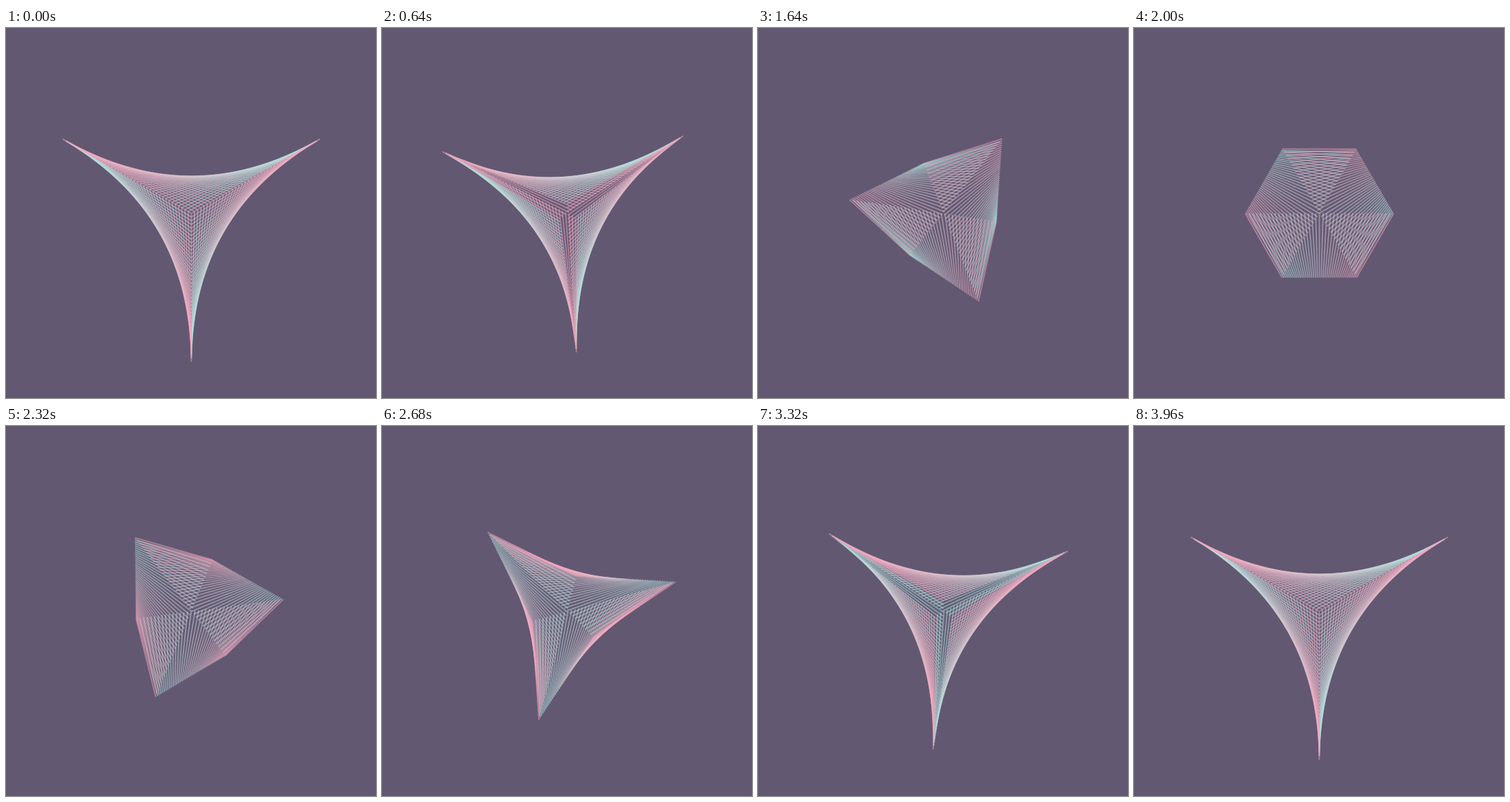
These frames come from a looping animation (540x540 px, 4 s). An HTML page with a canvas:

```html
<!DOCTYPE html>
<html lang="en">
<head>
<meta charset="utf-8">
<title>String star</title>
<style>
  html, body { margin: 0; width: 100%; height: 100%; overflow: hidden; background: #625872; }
  canvas { display: block; width: 540px; height: 540px; }
</style>
</head>
<body>
<canvas id="stage" width="540" height="540"></canvas>
<script>
const ctx = document.getElementById('stage').getContext('2d');
const LOOP = 4000, CENTER = 270.5, RADIUS = 216.7, STRINGS = 40;
const PINK = [250, 165, 190], CYAN = [168, 236, 226];
const DEG = Math.PI / 180;

const mix = (a, b, s) => a + (b - a) * s;
const mixPoint = (p, q, s) => p.map((v, i) => mix(v, q[i], s));

// Angles run counter-clockwise on screen, starting straight down.
const polar = (r, deg) => [CENTER + r * Math.sin(deg * DEG), CENTER + r * Math.cos(deg * DEG)];

function draw(time) {
  const ease = (1 - Math.cos(Math.PI * time / LOOP)) / 2;
  const turn = 60 * ease;
  const outer = RADIUS * (1 - ease), inner = RADIUS * ease;

  ctx.fillStyle = '#625872';
  ctx.fillRect(0, 0, 540, 540);
  ctx.lineWidth = 1.9;
  ctx.globalAlpha = 0.5;

  // Each family blends between two edges of a hexagon with alternating radii;
  // its cyan edge is the next family's pink one, so it is drawn only once.
  for (let i = 1; i <= STRINGS; i++) {
    const s = i / STRINGS;
    ctx.strokeStyle = `rgb(${mixPoint(CYAN, PINK, s).map(Math.round)})`;
    for (let k = 0; k < 3; k++) {
      const angle = turn + 120 * k;
      const from = mixPoint(polar(inner, angle - 60), polar(outer, angle), s);
      const to = mixPoint(polar(outer, angle - 120), polar(inner, angle + 60), s);
      ctx.beginPath();
      ctx.moveTo(...from);
      ctx.lineTo(...to);
      ctx.stroke();
    }
  }
  ctx.globalAlpha = 1;
}

function frame() {
  draw(performance.now() % LOOP);
  requestAnimationFrame(frame);
}
frame();
</script>
</body>
</html>
```
